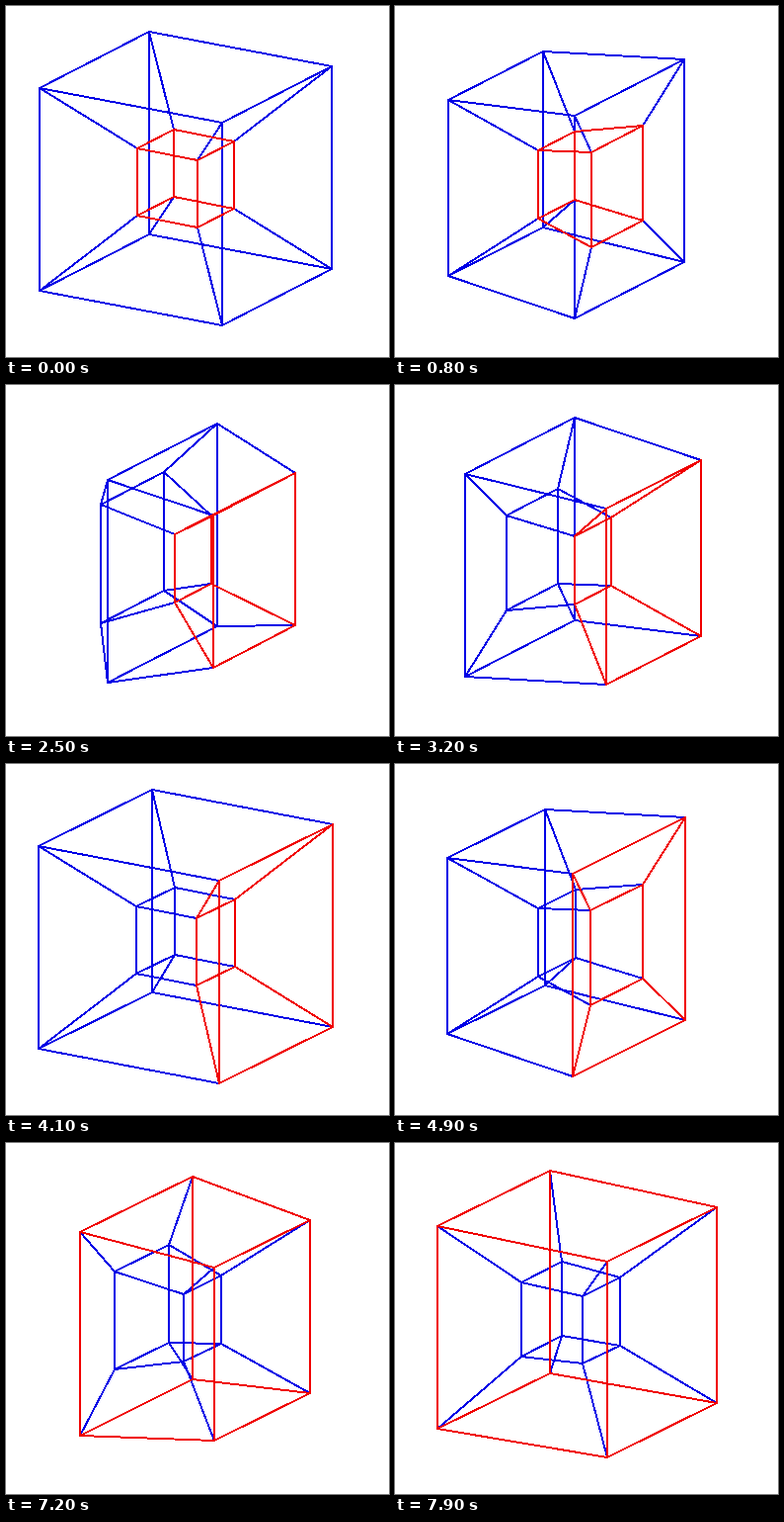
Animation, 388 px wide and 355 px high, one loop 8000 ms. Source, as an HTML page:

```html
<!DOCTYPE html>
<html lang="en">
<head>
<meta charset="utf-8">
<title>Turning tesseract</title>
<style>
  html, body { margin: 0; width: 100%; height: 100%; overflow: hidden; background: #fff; }
  svg { display: block; }
  path { fill: none; stroke-width: 2; stroke-linecap: round; shape-rendering: crispEdges; }
</style>
</head>
<body>
<svg width="388" height="355" viewBox="0 0 388 355">
  <path id="blue" stroke="#0000e6"/>
  <path id="red" stroke="#f00000"/>
</svg>
<script>
const STEP = 100, FRAMES = 80, TURN = 40;
const CX = 182, CY = 174.5, R = 107.85;
const DEG = Math.PI / 180, TILT = 18 * DEG;

// Each face travels through these slots: [offset along the turning axis, size].
const SLOTS = [[1, 1], [-1, 1], [-1 / 3, 1 / 3], [1 / 3, 1 / 3]];
// Corners of a face, in order around it: [depth, height].
const CORNERS = [[-1, -1], [1, -1], [1, 1], [-1, 1]];

const blue = document.getElementById('blue');
const red = document.getElementById('red');
const mix = (a, b, t) => a + (b - a) * t;

function faceAt(k, turn, t, yaw) {
  const [u0, m0] = SLOTS[(k + turn) % 4];
  const [u1, m1] = SLOTS[(k + turn + 1) % 4];
  const u = mix(u0, u1, t), m = mix(m0, m1, t);
  const sin = Math.sin(yaw), cos = Math.cos(yaw);
  return CORNERS.map(([depth, height]) => {
    const d = depth * m;
    const x = CX + R * (u * cos + d * sin);
    const y = CY + R * (Math.sin(TILT) * (u * sin - d * cos) + Math.cos(TILT) * height * m);
    return [Math.round(x), Math.round(y)];
  });
}

function draw(frame) {
  // Every turn shows both of its end poses, then the view yaws by one degree.
  const turn = Math.floor(frame / (TURN + 1));
  const t = frame % (TURN + 1) / TURN;
  const faces = SLOTS.map((_, k) => faceAt(k, turn, t, (31 + turn) * DEG));
  let cold = '', hot = '';
  faces.forEach((face, k) => {
    const next = faces[(k + 1) % 4];
    const ring = `M${face.join('L')}Z`;
    const links = face.map((p, j) => `M${p}L${next[j]}`).join('');
    if (k > 1) hot += ring; else cold += ring;
    if (k === 2) hot += links; else cold += links;
  });
  blue.setAttribute('d', cold);
  red.setAttribute('d', hot);
}

const start = performance.now();
function tick() {
  draw(Math.floor((performance.now() - start) / STEP) % FRAMES);
  requestAnimationFrame(tick);
}
tick();
</script>
</body>
</html>
```
